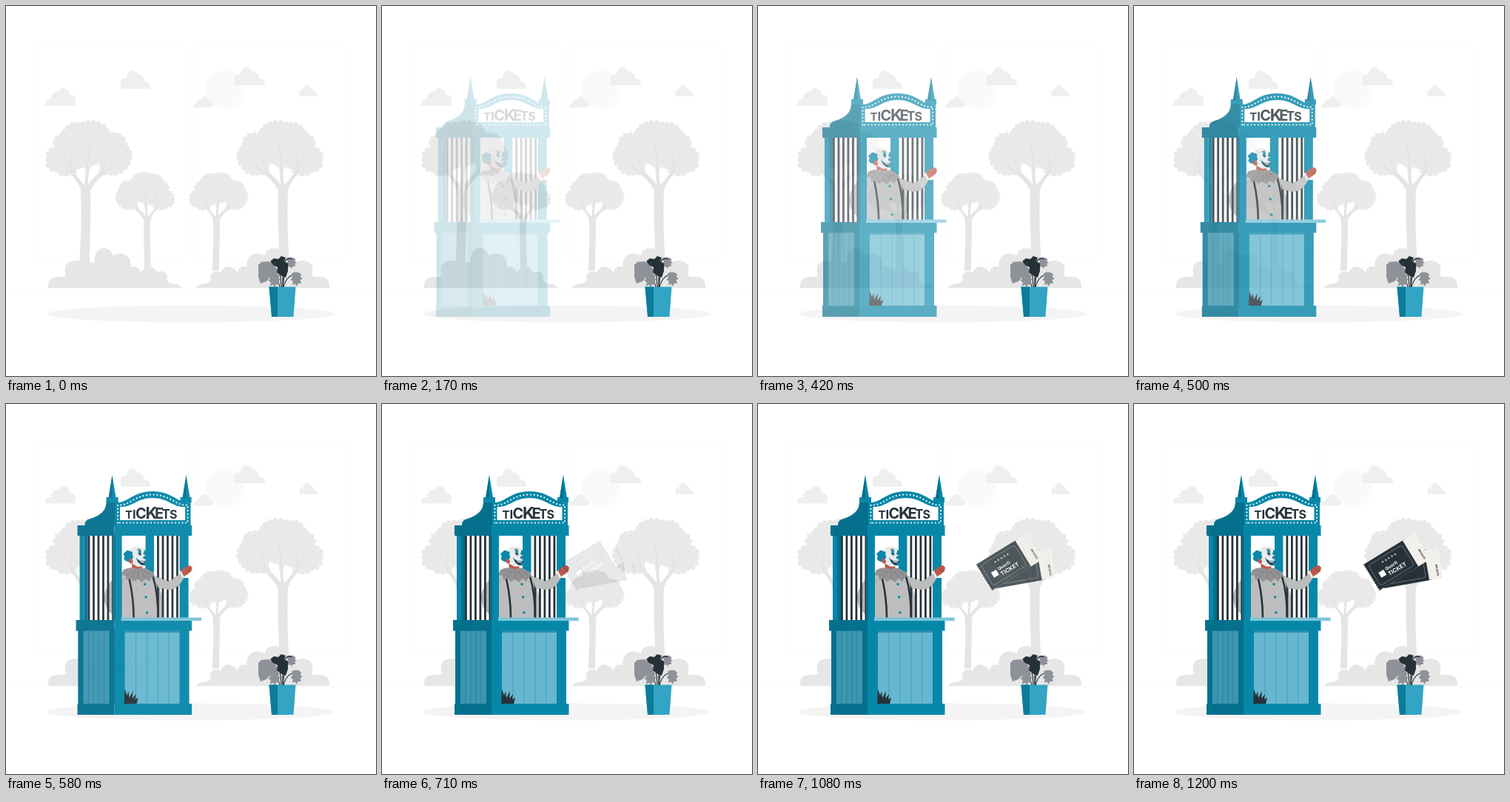
An HTML page that plays this animation: 500x500 px, repeating every 1440 ms.

```html
<!DOCTYPE html>
<html lang="en">
<head>
<meta charset="utf-8">
<title>Ticket booth</title>
<style>
  html, body { margin: 0; width: 100%; height: 100%; overflow: hidden; background: #fff; }
  svg { display: block; width: 100%; height: 100%; }
  text { font-family: Inter, "Open Sans", sans-serif; font-weight: 700; }
  .main { fill: #0787a8; }
  .side { fill: #04708e; }
  .ink { fill: #263238; }
  .line { fill: none; stroke-linecap: round; }
</style>
</head>
<body>
<svg viewBox="0 0 500 500">
  <defs>
    <path id="cloud" d="M2 24Q-1 20 1 13Q3 9 9 10Q9 1 17 0Q22 0 24 5Q33 6 34 15Q42 15 42 23Q42 24 40 24Z"/>
    <path id="crown" d="M57 207C55 200 58 194 68 193C64 184 68 176 78 174C80 163 92 157 101 161C110 155 130 157 136 167C133 172 138 173 145 174C156 173 162 182 160 190C169 194 170 208 163 215C159 223 148 229 139 225L128 226L125 212L114 216L112 224L96 222L88 226C78 229 70 225 69 222C60 222 55 216 57 207Z"/>
    <g id="tree">
      <use href="#crown" fill="#e9e9e9"/>
      <use href="#crown" class="line" stroke="#e9e9e9" stroke-width="7" stroke-dasharray="0 7.2"/>
      <path fill="#fff" d="M94 222L106 217L109 232L107 238ZM113 218L126 212L127 221L112 236Z"/>
      <path fill="#e5e5e5" d="M99 348C102 310 102 275 101 248C97 238 91 231 85 223L90 220C95 230 102 238 106 242L109 216L112 216L111 241C117 233 123 228 130 222L134 226C126 233 118 240 114 250C115 280 113 320 113 348Z"/>
      <path class="line" stroke="#e3e3e3" stroke-width="1.6" d="M88 223L80 205M88 222L89 195M110 220L113 185M131 224L136 203M132 225L152 211"/>
    </g>
    <path id="bush" fill="#e6e6e6" d="M57 381Q56 366 70 366Q78 367 81 364Q75 345 94 344Q101 344 104 349Q110 344 119 347Q120 328 131 327Q142 327 145 338Q154 331 163 337Q171 345 168 353Q177 349 182 360Q187 352 194 352Q201 353 204 360Q216 355 218 366Q216 372 222 375Q234 375 238 381Z"/>
    <path id="leaf" d="M0 2C5-2 13-1 16 4L14 7L18 9L14 12L16 16L10 17L9 21L5 17L1 19L2 13L-2 11L1 8Z"/>
    <g id="pass">
      <rect class="ink" width="66" height="41"/>
      <rect x="62" width="18" height="41" fill="#f1f0ea"/>
      <path class="line" stroke="#fff" stroke-width="1.8" stroke-dasharray="0 3.7" d="M0 2V40"/>
      <path class="line" stroke="#fff" stroke-width="1.8" stroke-dasharray="0 3.7" d="M80 2V40"/>
      <rect x="5" y="4.5" width="53" height="32" rx="3" fill="none" stroke="#8b9195" stroke-width=".6"/>
      <text transform="translate(76 37) rotate(-90)" font-size="3.6" class="ink">5206148</text>
    </g>
  </defs>

  <g fill="none" stroke="#fafafa">
    <path d="M38.500 55.500H241.500V338H38.500ZM253.500 55.500H457.500V338H253.500Z"/>
    <path stroke="#f5f5f5" stroke-width=".6" d="M0 382H500"/>
  </g>
  <circle cx="296" cy="113" r="26" fill="#fafafa"/>
  <g fill="#efefef">
    <use href="#cloud" transform="translate(94.500 110.500) scale(-.99 1)"/>
    <use href="#cloud" transform="translate(154.500 87) scale(.97 1.03)"/>
    <use href="#cloud" transform="translate(308 83)"/>
    <use href="#cloud" transform="translate(396 107) scale(.61 .63)"/>
    <use href="#cloud" transform="translate(280 122) scale(-.65 .64)"/>
  </g>
  <use href="#tree"/>
  <use href="#tree" transform="translate(482) scale(-1 1)"/>
  <use href="#tree" transform="translate(264.500 118.500) scale(-.686 .686)"/>
  <use href="#tree" transform="translate(210.500 118.500) scale(.686)"/>
  <use href="#bush"/>
  <use href="#bush" transform="translate(494) scale(-1 1)"/>
  <ellipse cx="249.500" cy="416" rx="194" ry="11.500" fill="#f4f4f4"/>

  <!-- plant -->
  <path class="line" stroke="#263238" stroke-width="1.200" d="M372 380C372 366 370 360 368 352M374 380C376 362 378 350 386 343M375 380C378 368 384 364 390 363M370 380C368 368 362 358 354 350"/>
  <g fill="#8e9298">
    <path d="M341 350L345 346L354 345L362 349L367 357L369 361L362 362L357 366L352 372L344 375L341 366Z"/>
    <use href="#leaf" transform="translate(356 361) scale(.85 .92)"/>
    <use href="#leaf" transform="translate(380 340) scale(.72 .7)"/>
    <use href="#leaf" transform="translate(386 360) scale(.82 .9)"/>
  </g>
  <path class="ink" d="M357 345L362 341L368 342L372 338L378 340L376 345L381 348L381 358L378 367L371 364L366 360L367 353L361 350Z"/>
  <path class="line" stroke="#263238" stroke-width="1.400" d="M374 360V380M377 345Q381 339 386 342"/>
  <path fill="#33a4c3" d="M355.500 379.500H391.500L388.500 420H359Z"/>
  <path fill="#0c7b9b" d="M355.500 379.500H367V420H359Z"/>

  <g id="booth">
    <path fill="#fff" d="M105 176H240V294H105Z"/>

    <!-- clown -->
    <path fill="#b5b5b6" d="M160 226C146 232 133 250 134 264C136 278 143 286 158 289L160 276L148 264L160 250Z"/>
    <path fill="#bdbdbe" d="M160 228C174 222 194 224 204 233L222 239L238 228L243 236C238 246 230 251 222 251L209 249C214 262 215 276 214 290H157C155 270 155 248 160 228Z"/>
    <path class="line" stroke="#a3a3a5" d="M204 240L210 250M160 236L155 256"/>
    <path class="line" stroke="#263238" stroke-width="2.600" d="M168 236C172 254 174 272 174 289M200 233C205 250 207 272 207 289"/>
    <g class="main">
      <circle cx="189" cy="243.500" r="1.800"/><circle cx="190.500" cy="261" r="1.800"/><circle cx="192" cy="282" r="1.800"/>
    </g>
    <path fill="#bb5c4c" d="M171 210L186 214L185 228H172Z"/>
    <path fill="#929294" d="M160 224Q170 219 179 223Q191 219 200 225L202 232L198 235L195 240L190 236L185 241L180 237L174 240L170 236L164 238L163 232L158 231Z"/>
    <path class="line" stroke="#77777a" stroke-width=".8" d="M176 225L170 235M180 225L180 236M184 225L190 235M172 225L164 233M188 225L197 231"/>
    <path fill="#e9eaeb" d="M169 208C165 197 173 191 181 193C189 194 192 201 191 207L193 213L190 219L180 220L172 216Z"/>
    <path class="main" d="M163 212Q159 209 162 206Q158 202 163 200Q165 196 169 199Q174 199 172 204Q175 207 171 210Q169 215 163 212Z"/>
    <path fill="#bb5c4c" d="M168 209Q173 208 173 214Q170 218 167 213Z"/>
    <path class="main" d="M177 207Q182 214 190 212L191 218Q180 220 177 207ZM180 198L184 197L184 205L181 204ZM188 197L190 198L191 204L188 204Z"/>
    <circle cx="189" cy="207.500" r="2.200" class="main"/>
    <path class="ink" d="M179 210Q184 214 190 212Q189 217 185 217Q181 216 179 210Z"/>
    <path fill="#fff" d="M181 211.500Q185 214 189 213L188 214.500Q184 215 181 211.500Z"/>
    <path class="line" stroke="#263238" stroke-width=".9" d="M180 202L184 203M187 202L189 202M179 197L183 196"/>

    <!-- bars and frame -->
    <path fill="none" stroke="#263238" stroke-width="116" stroke-dasharray="2.800 3.700" d="M112 235H146M205.500 235H236"/>
    <path class="main" d="M101 176H107V294H101ZM146 176H158V294H146ZM190 176H201.500V228L190 222ZM236 176H248V222L236 226ZM236 235H248V294H236Z"/>
    <path class="side" d="M107 176H112V294H107ZM146 176H149V294H146Z"/>
    <path fill="#bdbdbe" d="M203 233L222 240L237 229L241 236C236 246 229 251 221 251L207 248Z"/>
    <path fill="#e9eaeb" d="M236 227L240 225L245 233L240 236Z"/>
    <path fill="#b9584a" d="M238 226L242 221L250 218L253 221L252 226L247 230L242 233Z"/>
    <path class="line" stroke="#8f4035" stroke-width=".6" d="M245 224L251 222M245 227L251 225"/>

    <!-- lower half -->
    <path class="main" d="M99 304H249V407H99Z"/>
    <path class="side" d="M99 304H106V407H99ZM141 304H148V407H141Z"/>
    <path fill="#3d96af" d="M106 306H141V405H106Z"/>
    <path fill="#66b7cf" d="M162 306H236V405H162Z"/>
    <path class="line" stroke="#1d829e" stroke-width=".8" d="M113 307V404M120 307V404M127 307V404M134 307V404"/>
    <path class="line" stroke="#3f9dba" stroke-width=".9" d="M177 307V404M192 307V404M207 307V404M221.500 307V404"/>
    <path fill="#2a92b0" d="M162 306H236V309H162Z"/>
    <path class="ink" d="M161 405L162 385L165 394L167 388L168 397L173 388L172 398L177 392L176 399L180 397L178 405Z"/>
    <path class="side" d="M98 405H148V420H98ZM96 292H148V306.500H96ZM98 164H148V178H98Z"/>
    <path class="main" d="M148 405H252.500V420H148ZM148 292H252.500V306.500H148ZM148 164H252.500V178H148Z"/>
    <path fill="#7dc4d9" d="M157 288.500H265.500V293H157Z"/>
    <path class="line" stroke="#04708e" stroke-width=".8" d="M186 176L190 171M193 175L198 170M200 174L203 171M152 330L156 325M152 362L156 357"/>

    <!-- roof and sign -->
    <path class="side" d="M108 164C108 154 117 156 125 151C134 146 137 140 137 131H153V164Z"/>
    <path class="main" d="M140 127L145 96L150 127ZM240 127L245 96L250 127ZM137 126H153V133H137ZM237 126H252V133H237Z"/>
    <path class="side" d="M140 127L145 96V127ZM240 127L245 96V127Z"/>
    <path class="main" d="M149 164V133C166 135 172 118 199.500 118C227 118 233 135 251 133V164Z"/>
    <path fill="#fff" d="M155.500 157V139C172 140 178 127 199.500 127C221 127 227 140 243.500 139V157Z"/>
    <path class="line" stroke="#fff" stroke-width="2.200" stroke-dasharray="0 4.700" d="M152.500 160.500V136.500C169 138 175 122.500 199.500 122.500C224 122.500 230 138 247 136.500V160.500Z"/>
    <text id="sign" class="ink"></text>
  </g>

  <g id="tickets">
    <use href="#pass" transform="translate(331 208.500) rotate(-10)"/>
    <g transform="translate(310 217) rotate(-31.500)">
      <use href="#pass"/>
      <path fill="none" stroke="#59646a" stroke-width=".5" d="M0 41H62"/>
      <text x="22" y="12" font-size="4.200" fill="#d8dadb" letter-spacing=".5">★★★★★</text>
      <rect x="11.500" y="20" width="8" height="8" fill="#fff"/>
      <text x="22" y="23" font-size="6" fill="#fff">Quorfi</text>
      <text x="22" y="31.500" font-size="7.600" fill="#fff">TICKET</text>
    </g>
  </g>
</svg>
<script>
  const LOOP = 1440, STEP = 41.4;
  const get = id => document.getElementById(id);

  // letter, left edge, baseline, size
  const letters = [
    ["T", 162.5, 154.5, 15], ["I", 172.5, 154.5, 16.5], ["C", 176.5, 155, 20], ["K", 190, 155, 22],
    ["E", 202.5, 155, 20], ["T", 212, 154.5, 17], ["S", 222.5, 154.5, 16]
  ];
  get("sign").innerHTML = letters.map(([c, x, y, size]) =>
    `<tspan x="${x}" y="${y}" font-size="${size}">${c}</tspan>`).join("");

  // each part slides in from the left while it fades in
  const parts = [
    { el: get("booth"), start: 1.6, shift: 31 },
    { el: get("tickets"), start: 15.6, shift: 77 }
  ];

  function draw(now) {
    const step = Math.floor((now % LOOP + 3) / STEP);
    for (const { el, start, shift } of parts) {
      const p = Math.min(1, Math.max(0, (step - start) / 13));
      el.setAttribute("opacity", p);
      el.setAttribute("transform", `translate(${shift * (p - 1)})`);
    }
  }

  const origin = performance.now();
  function tick() {
    draw(performance.now() - origin);
    requestAnimationFrame(tick);
  }
  tick();
</script>
</body>
</html>
```
